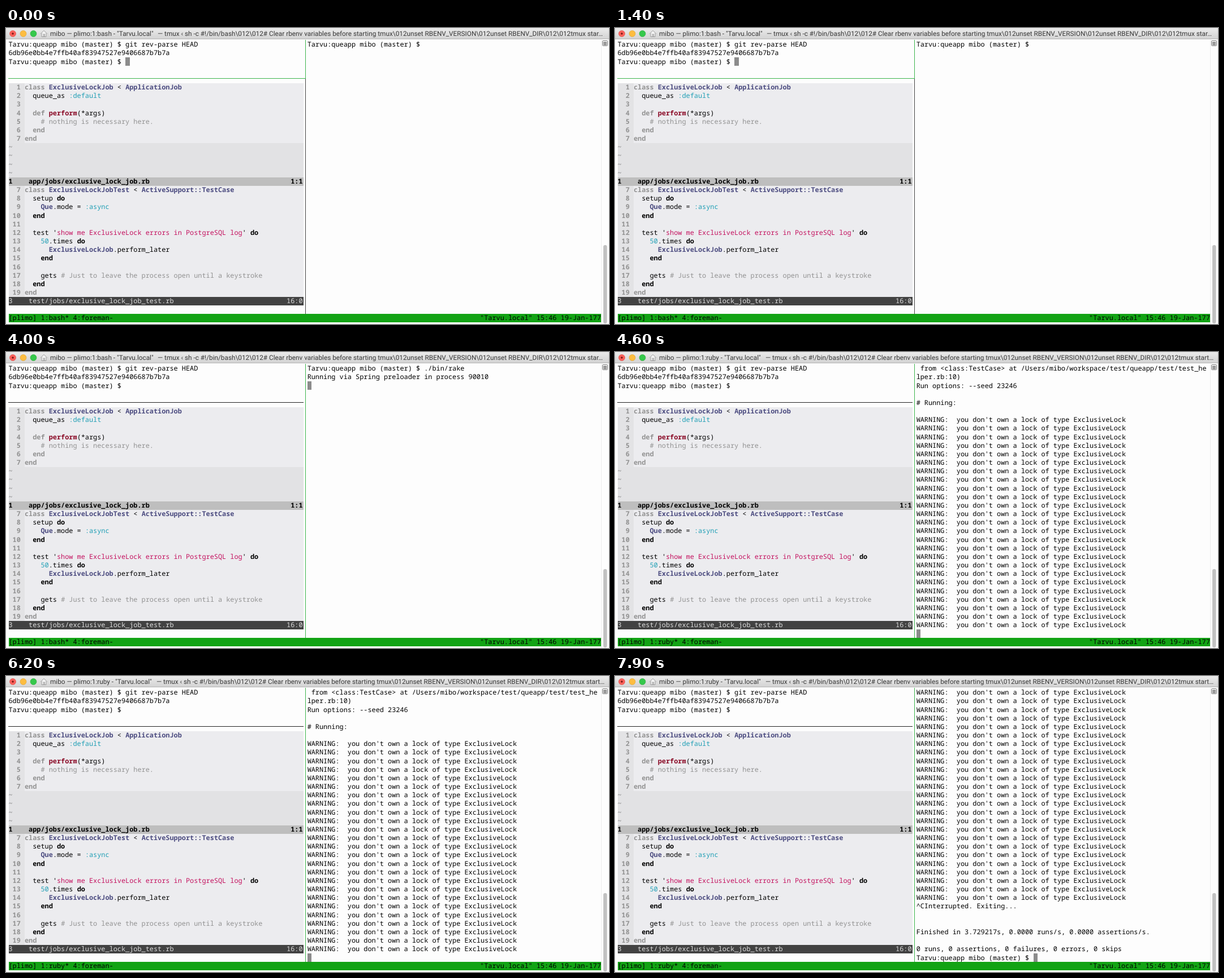
Animation of 1066x525 px, one loop 8000 ms. Source, as an HTML page:

```html
<!DOCTYPE html>
<html lang="en">
<head>
<meta charset="utf-8">
<title>Terminal session</title>
<style>
  :root { --w: 7.137px; --h: 15.17px; --green: #3cb54c; }
  html, body { margin: 0; width: 100%; height: 100%; overflow: hidden; background: #fdfdfd; }
  #stage { position: relative; width: 1066px; height: 525px; overflow: hidden; text-rendering: geometricPrecision; }
  #stage > * { position: absolute; margin: 0; }
  pre { font: 500 11.895px/var(--h) "Noto Sans Mono", monospace; color: #000; top: 22.2px; white-space: pre; }
  #bar { left: 0; top: 0; width: 1066px; height: 20px; background: linear-gradient(#ebebeb, #d3d3d3); border-bottom: 1px solid #b5b5b5; box-sizing: border-box; }
  .title { top: 0; font: 11.79px/20px Roboto, sans-serif; color: #383838; white-space: pre; }
  /* blocks on the character grid: column, row, columns, rows */
  .cell { left: calc(4.5px + var(--c, 0) * var(--w)); top: calc(21.9px + var(--r) * var(--h));
          width: calc(var(--cs, 73) * var(--w)); height: calc(var(--rs, 1) * var(--h)); }
  #cursor { background: #8c8c8c; }
  .k { color: #929292; font-weight: bold; }   /* keywords, line numbers */
  .c { color: #4c4c80; font-weight: bold; }   /* constants */
  .f { color: #8a0a26; font-weight: bold; }
  .s { color: #c4125f; }
  .v { color: #209fb5; }
  .m { color: #929292; }
  .q { color: #444; font-weight: bold; }
  .on { color: #dedede; }
</style>
</head>
<body>
<div id="stage">
  <div id="bar"></div>
  <svg width="1066" height="525">
    <g stroke-width=".6">
      <circle cx="12" cy="10" r="5.5" fill="#fb615b" stroke="#dd4a44"/>
      <circle cx="30.5" cy="10" r="5.5" fill="#fdbd40" stroke="#dca031"/>
      <circle cx="48.5" cy="10" r="5.5" fill="#36c84b" stroke="#2aa83a"/>
    </g>
    <circle cx="12" cy="10" r="1.8" fill="#7c1a16"/>
    <path d="M61 10.5 67 4.5 73 10.5M63 9.5V15.5H71V9.5M66 15.5V11.5H68.500V15.5" fill="#f4f4f4" stroke="#999"/>
    <path d="M1052.500 21V525" stroke="#ececec"/>
    <rect x="1056" y="385" width="6.500" height="139" rx="3.200" fill="#c1c1c1"/>
    <rect x="1054.500" y="22.500" width="9" height="9" rx="1" fill="#f2f2f2" stroke="#777"/>
    <path d="M1056 25.500H1062M1056 27.500H1062M1056 29.500H1062" stroke="#444"/>
  </svg>
  <div class="title" id="head" style="left:78px"></div>
  <div class="title" id="tail"></div>

  <div class="cell" style="--r:5;--rs:7;background:#ececef"></div>
  <div class="cell" style="--r:12;--rs:4;background:#e2e2e4"></div>
  <div class="cell" style="--r:16;background:#bebebe"></div>
  <div class="cell" style="--r:17;--rs:13;background:#ececef"></div>
  <div class="cell" style="--r:5;--rs:7;--cs:4;background:#e3e3e5"></div>
  <div class="cell" style="--r:17;--rs:13;--cs:4;background:#e3e3e5"></div>
  <div class="cell" style="--r:30;background:#424242"></div>
  <div class="cell" style="--r:32;--cs:146.800;background:#12a314"></div>

  <div id="across" style="left:4px;top:89px;height:1px"></div>
  <div id="upper" style="left:529px;top:21px;width:1px;height:69px;background:var(--green)"></div>
  <div id="lower" style="left:529px;top:90px;width:1px;height:417px"></div>
  <div class="cell" id="cursor" style="--cs:1"></div>

  <pre id="left" style="left:4.500px"></pre>
  <pre id="right" style="left:532.640px"></pre>
  <pre id="status" style="left:4.500px;top:507.200px"></pre>
</div>
<script>
const $ = id => document.getElementById(id);
const LOOP = 8000, ROWS = 32, RIGHT_COL = 74;
const SWITCH = 1900, CLEARED = 2700, ENTER = 3700, SPRING = 3900, RUN = 4500, INTERRUPT = 7700;
const prompt = 'Tarvu:queapp mibo (master) $ ';

const tag = (cls, text) => `<span class="${cls}">${text}</span>`;
const number = (first, lines) => lines.map((line, i) =>
  tag('k', String(first + i).padStart(3)) + ' ' + line);

const job = number(1, [
  `${tag('k', 'class')} ${tag('c', 'ExclusiveLockJob')} &lt; ${tag('c', 'ApplicationJob')}`,
  `  queue_as ${tag('v', ':default')}`,
  '',
  `  ${tag('k', 'def')} ${tag('f', 'perform')}(*args)`,
  `    ${tag('m', '# nothing is necessary here.')}`,
  `  ${tag('k', 'end')}`,
  tag('k', 'end')
]);
const test = number(7, [
  `${tag('k', 'class')} ${tag('c', 'ExclusiveLockJobTest')} &lt; ${tag('c', 'ActiveSupport::TestCase')}`,
  '  setup <b>do</b>',
  `    ${tag('c', 'Que')}.mode = ${tag('v', ':async')}`,
  '  <b>end</b>',
  '',
  `  test ${tag('q', "'")}${tag('s', 'show me ExclusiveLock errors in PostgreSQL log')}${tag('q', "'")} <b>do</b>`,
  `    ${tag('v', '50')}.times <b>do</b>`,
  `      ${tag('c', 'ExclusiveLockJob')}.perform_later`,
  '    <b>end</b>',
  '',
  `    gets ${tag('m', '# Just to leave the process open until a keystroke')}`,
  '  <b>end</b>',
  tag('k', 'end')
]);
const fileBar = (no, path, pos) => `${no}    ${path}`.padEnd(73 - pos.length) + pos;

$('left').innerHTML = [
  prompt + 'git rev-parse HEAD',
  '6db96e0bb4e7ffb40af83947527e9406687b7b7a',
  prompt, '', '',
  ...job,
  ...Array(4).fill(tag('k', '~')),
  `<b>${fileBar(1, 'app/jobs/exclusive_lock_job.rb', '1:1')}</b>`,
  ...test,
  tag('on', fileBar(3, 'test/jobs/exclusive_lock_job_test.rb', '16:0'))
].join('\n');

const running = [
  ' from <class:TestCase> at /Users/mibo/workspace/test/queapp/test/test_he',
  'lper.rb:10)',
  'Run options: --seed 23246', '',
  '# Running:', '',
  ...Array(25).fill("WARNING:  you don't own a lock of type ExclusiveLock")
];
const finished = [
  '^CInterrupted. Exiting...', '', '',
  'Finished in 3.729217s, 0.0000 runs/s, 0.0000 assertions/s.', '',
  '0 runs, 0 assertions, 0 failures, 0 errors, 0 skips',
  prompt
];

const typed = (text, t, start, step) =>
  text.slice(0, Math.max(0, Math.floor((t - start) / step) + 1));

function output(t) {
  if (t < CLEARED) return [prompt + typed('clear', t, 2100, 100)];
  if (t < ENTER) return [prompt + typed('./bin/rake', t, 2800, 80)];
  if (t < SPRING) return [prompt + './bin/rake', ''];
  if (t < RUN) return [prompt + './bin/rake', 'Running via Spring preloader in process 90010', ''];
  return [...running, ...(t < INTERRUPT ? [''] : finished)];
}

function setText(id, text) {
  if ($(id).textContent !== text) $(id).textContent = text;
}

function draw(t) {
  const onLeft = t < SWITCH, ruby = t >= RUN;
  const name = ruby ? 'ruby' : 'bash';
  const lines = output(t).slice(-ROWS);

  setText('right', lines.join('\n'));
  setText('status', `[plimo] 1:${name}* 4:foreman-`.padEnd(117) + '"Tarvu.local" 15:46 19-Jan-177');
  setText('head', `mibo — plimo:1:${name} - "Tarvu.local"`);
  setText('tail', '— tmux ‹ sh -c #!/bin/bash\\012\\012# Clear rbenv variables before starting tmux' +
    `\\012unset RBENV_VERSION\\012unset RBENV_DIR\\012\\012tmux star${ruby ? 't' : ''}…`);
  $('tail').style.left = (ruby ? 266 : 268) + 'px';

  const row = onLeft ? 2 : lines.length - 1;
  const col = onLeft ? prompt.length : RIGHT_COL + lines[row].length;
  $('cursor').style.setProperty('--r', row);
  $('cursor').style.setProperty('--c', col);

  $('across').style.width = (onLeft ? 525 : 522) + 'px';
  $('across').style.background = onLeft ? 'var(--green)' : '#222';
  $('lower').style.background = onLeft ? '#444' : 'var(--green)';
}

function tick() {
  draw(performance.now() % LOOP);
  requestAnimationFrame(tick);
}
tick();
</script>
</body>
</html>
```
